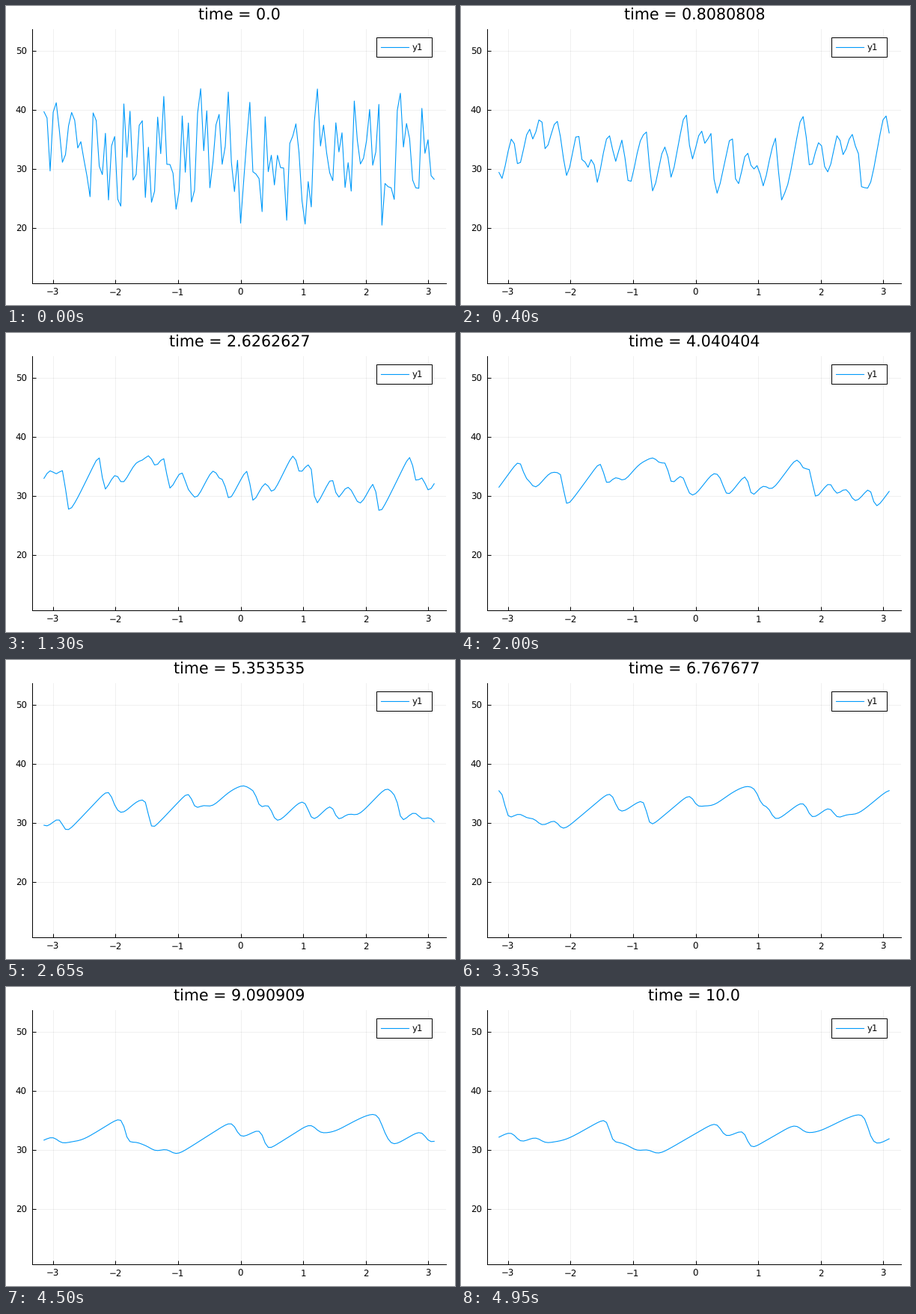
Recreate the animation shown at these times as a matplotlib script. Size 600 by 400 pixels, loop 5000 ms.

```python
import numpy as np
import matplotlib.pyplot as plt
from matplotlib.animation import FuncAnimation
from matplotlib.patches import Rectangle

plt.rcParams["font.family"] = "DejaVu Sans"
plt.rcParams["text.hinting"] = "none"

W, H = 600, 400
PX = 0.72                       # points per pixel at 100 dpi
FRAMES, INTERVAL = 100, 50
T_END = 10
N = 128                         # grid cells
NU = 0.001                      # viscosity
SCALE = 64                      # plotted height per unit of wave speed
MEAN = 32
BLUE = "#009afa"

# Valleys of the potential (cell, level): each one spreads into a ramp
VALLEYS = [(-1, 0), (2, 12), (7, 33), (15, 46), (21, 52), (25, 42), (30, 52),
           (36, 45), (44, 43), (49, 40), (55, 62), (65, 64), (71, 58),
           (75, 58), (79, 44), (87, 25), (94, 44), (100, 43), (104, 54),
           (114, 40), (122, 55), (127, 60)]


def starting_wave():
    """Slope of a potential with random ridges between its valleys."""
    rng = np.random.default_rng(3)
    pos, level = np.transpose(VALLEYS)
    cells = np.arange(-1, N)
    j = np.clip(np.searchsorted(pos, cells, side="right") - 1, 0, len(pos) - 2)
    gap = pos[j + 1] - pos[j]
    arch = gap * np.sin(np.pi * (cells - pos[j]) / gap)
    ridge = arch * rng.uniform(1, 2.8, len(cells))
    return MEAN + np.diff(np.interp(cells, pos, level) + ridge)


start = starting_wave()
x = -np.pi + 2 * np.pi * np.arange(N) / N

# Two periods of the starting wave, refined, and its running integral
nodes = np.linspace(-3 * np.pi, np.pi, 2 * N + 1)
fine = np.linspace(-3 * np.pi, np.pi, 32 * N + 1)
speed = np.interp(fine, nodes, np.append(np.tile(start, 2), start[0])) / SCALE
steps = (speed[1:] + speed[:-1]) / 2 * np.diff(fine)
potential = np.concatenate([[0], np.cumsum(steps)])
dist = x[:, None] - fine


def wave(t):
    """Viscous Burgers flow at time t (Cole-Hopf solution)."""
    if t == 0:
        return start
    cost = potential + dist ** 2 / (2 * t)
    cost -= cost.min(axis=1, keepdims=True)
    weight = np.exp(-cost / (2 * NU))
    return SCALE * (weight * dist).sum(axis=1) / (t * weight.sum(axis=1))


fig = plt.figure(figsize=(W / 100, H / 100), dpi=100, facecolor="white")


def label(px, py, text, size=11.8, ha="center"):
    return fig.text(px / W, 1 - py / H, text, fontsize=size * PX,
                    ha=ha, va="baseline", color="black")


LEFT, RIGHT, TOP, BOTTOM = 35.1, 587.8, 30.7, 371.2
ax = fig.add_axes([LEFT / W, 1 - BOTTOM / H,
                   (RIGHT - LEFT) / W, (BOTTOM - TOP) / H])
ax.set_xlim(-3.3286, 3.2795)
ax.set_ylim(10.58, 53.74)
xticks, yticks = range(-3, 4), range(20, 51, 10)
ax.set_xticks(xticks)
ax.set_yticks(yticks)
ax.tick_params(direction="in", length=5 * PX, width=PX,
               labelbottom=False, labelleft=False)
ax.set_axisbelow(True)
ax.grid(color="black", alpha=0.06, linewidth=PX)
for side in ("left", "bottom"):
    ax.spines[side].set_linewidth(PX)
for side in ("top", "right"):
    ax.spines[side].set_visible(False)

for v in xticks:
    label(313.4 + 83.65 * v, 387.2, str(v).replace("-", "\u2212"))
for v in yticks:
    label(27.7, 65 + 7.89 * (50 - v), str(v), ha="right")

line, = ax.plot(x, start, color=BLUE, linewidth=1.1 * PX)
title = label(311.8, 19, "", size=20.7)

# Legend, laid out in pixels
key = fig.add_axes([0, 0, 1, 1])
key.set_xlim(0, W)
key.set_ylim(H, 0)
key.axis("off")
key.add_patch(Rectangle((495.1, 41.9), 74, 26, facecolor="white",
                        edgecolor="black", linewidth=PX))
key.plot([500.5, 537.5], [55, 55], color=BLUE, linewidth=1.1 * PX)
label(543, 59, "y1", ha="left")


def update(i):
    t = T_END * i / (FRAMES - 1)
    line.set_ydata(wave(t))
    title.set_text(f"time = {str(np.float32(t))}")
    return line, title


anim = FuncAnimation(fig, update, frames=FRAMES, interval=INTERVAL,
                     repeat=True, repeat_delay=0, blit=False)
plt.show()
```
